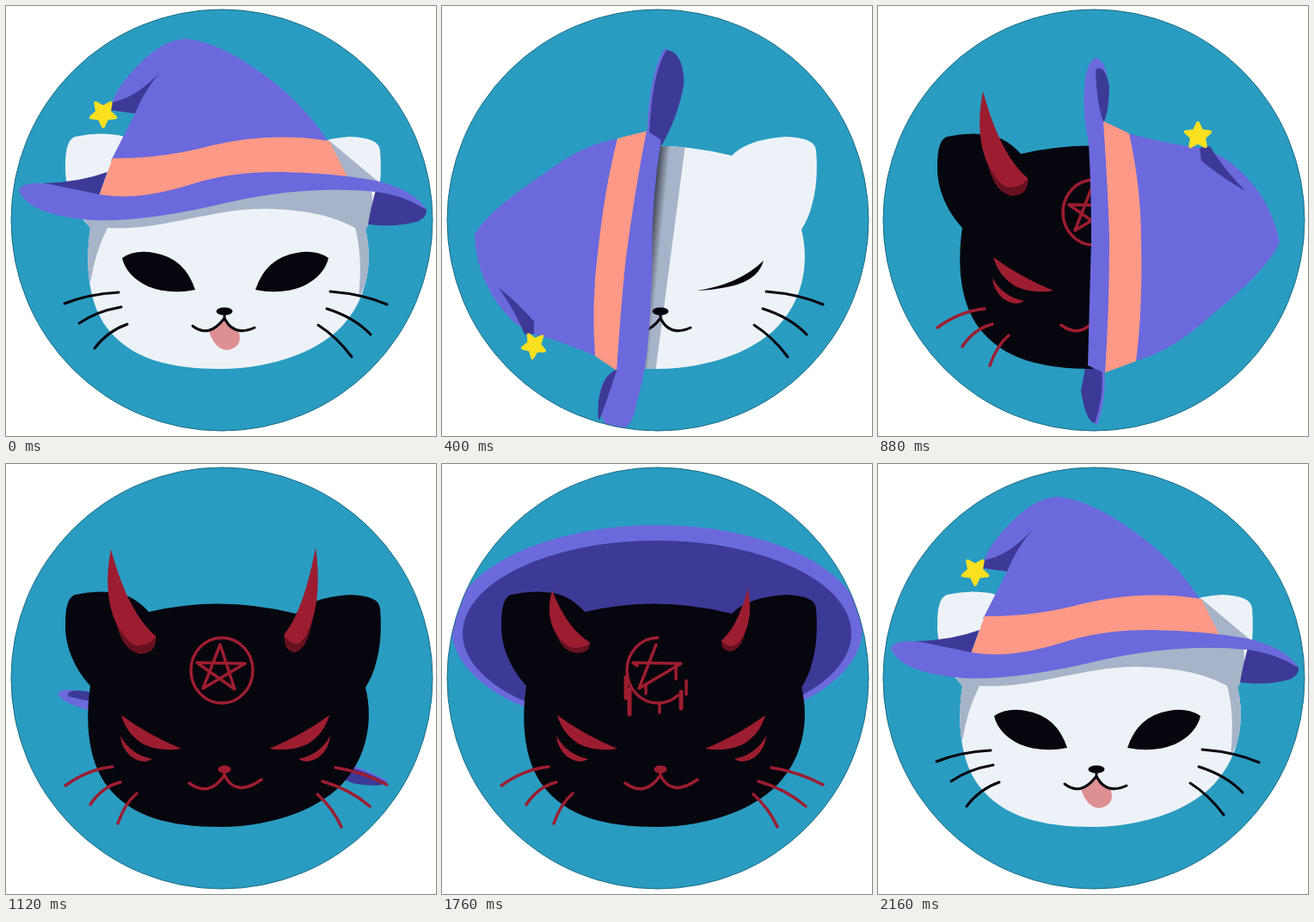
Write an HTML page with a canvas that moves like this. It is 500x500 px and loops after 2.4 s.

```html
<!DOCTYPE html>
<html lang="en">
<head>
<meta charset="utf-8">
<title>Cat and hat</title>
<style>
html, body { margin: 0; width: 100%; height: 100%; overflow: hidden; background: #fff; }
canvas { display: block; width: 100vw; height: 100vh; }
</style>
</head>
<body>
<canvas id="stage" width="500" height="500"></canvas>
<script>
const STEP = 80, LOOP = 2400;
const SKY = '#2a9cc1', FUR = '#edf2f8', SNOW = '#f8f9fc', SHADE = '#a7b3c8', INK = '#06060f',
  PURPLE = '#6c69dc', INDIGO = '#3d3a97', PINK = '#fd9986', RUST = '#c96b60',
  RED = '#9d1d30', BLOOD = '#661120', GOLD = '#fbe01f';

const stage = document.getElementById('stage').getContext('2d');
const layer = Object.assign(document.createElement('canvas'), { width: 500, height: 500 }).getContext('2d');

const HEAD = new Path2D('M98 258C82 240 68 215 69 185Q69 156 80 152Q105 146 130 150Q150 154 166 172Q250 152 337 174Q355 155 400 152Q434 153 435 168Q438 205 430 232Q427 245 418 260C428 300 418 340 396 366C370 400 310 422 250 422C190 422 145 410 118 375C95 345 92 300 98 258Z');

function shape(g, color, d) {
  g.fillStyle = color;
  g.fill(new Path2D(d));
}

function line(g, color, width, d) {
  g.strokeStyle = color;
  g.lineWidth = width;
  g.lineCap = g.lineJoin = 'round';
  g.stroke(new Path2D(d));
}

function oval(g, color, x, y, rx, ry) {
  g.fillStyle = color;
  g.beginPath();
  g.ellipse(x, y, rx, ry, 0, 0, 7);
  g.fill();
}

function within(g, draw) {
  g.save();
  draw();
  g.restore();
}

// Draws the left half feature, then its reflection.
function bothSides(g, draw) {
  draw();
  within(g, () => { g.transform(-1, 0, 0, 1, 510, 0); draw(); });
}

function star(g, x, y, r, degrees) {
  g.beginPath();
  for (let i = 0; i < 10; i++) {
    const a = degrees * Math.PI / 180 + i * Math.PI / 5, q = i % 2 ? r * .48 : r;
    g.lineTo(x + q * Math.cos(a), y + q * Math.sin(a));
  }
  g.closePath();
  g.fillStyle = g.strokeStyle = GOLD;
  g.lineWidth = 4;
  g.lineJoin = 'round';
  g.fill();
  g.stroke();
}

// ---- cat ----

function whiteFace(g, open) {
  bothSides(g, () => shape(g, INK, open
    ? 'M135 293Q150 283 172 287Q208 293 220 330Q190 336 165 326Q140 314 135 293Z'
    : 'M214 331Q165 324 136 296Q143 322 185 328Q200 331 214 331Z'));
  if (open) shape(g, '#dd8f92', 'M236 378Q248 376 255 363Q262 378 270 377Q277 396 258 400Q243 400 236 378Z');
  oval(g, INK, 254, 355, 9.5, 4.5);
  line(g, INK, 3, 'M254 357V364M217 372Q236 387 254 363Q265 385 289 374');
  line(g, INK, 3, 'M131 333Q95 335 68 346M134 350Q105 355 85 369M141 370Q118 378 103 398');
  line(g, INK, 3, 'M377 332Q415 335 443 347M373 352Q405 362 424 382M363 371Q385 385 402 408');
}

// The ring and the star are drawn in together as the amount grows.
function pentagram(g, amount) {
  if (!amount) return;
  within(g, () => {
    g.setLineDash([236 * amount, 999]);
    line(g, RED, 3.5, 'M251 202a36 38 0 0 0 0 76a36 38 0 0 0 0 -76');
    g.setLineDash([290 * amount, 999]);
    line(g, RED, 3.5, 'M249 210L229 261L278 232L222 231L266 262Z');
  });
}

function darkFace(g, pose) {
  g.fillStyle = INK;
  g.fill(HEAD);
  bothSides(g, () => {
    shape(g, RED, 'M134 292Q165 315 204 331Q180 335 160 326Q140 314 134 292Z');
    shape(g, RED, 'M133 316Q145 338 170 343Q160 350 145 340Q134 330 133 316Z');
  });
  oval(g, RED, 254, 355, 7.5, 4.5);
  line(g, RED, 3.5, 'M254 357V362M213 371Q236 388 254 362Q267 388 297 367');
  line(g, RED, 3.5, 'M124 352Q95 355 69 374M133 370Q112 375 98 396M152 383Q138 395 130 418');
  line(g, RED, 3.5, 'M383 353Q415 358 443 373M368 369Q400 378 423 398M362 384Q380 400 390 422');
  pentagram(g, pose.horns[0]);
  if (pose.drips) {
    line(g, RED, 5, 'M214 248V272M218 262V291M278 265V284');
    line(g, RED, 3.5, 'M253 278V289M237 256V267M272 234V250M284 252V268');
  }
}

function horn(g, size, right) {
  if (!size) return;
  within(g, () => {
    if (right) g.transform(-.7, 0, 0, 1, 445.4, -2);
    g.translate(160, 218);
    g.scale(.6 + .4 * size, size);
    g.translate(-160, -218);
    shape(g, RED, 'M122 99C133 140 150 180 174 200Q175 218 160 220Q138 222 128 185Q112 150 122 99Z');
    shape(g, BLOOD, 'M127 182Q140 209 152 211Q166 211 173 202Q176 219 156 221Q137 217 127 182Z');
  });
}

// Gradient whose opaque part is where the cat has turned dark.
function darkness(pose) {
  const { edge, core } = pose;
  const g = core
    ? layer.createRadialGradient(250, 225, core - 30, 250, 225, core)
    : layer.createLinearGradient(edge - 10, 165, edge + 10, 167);
  g.addColorStop(0, '#000');
  g.addColorStop(1, 'transparent');
  return g;
}

function masked(mode, pose, draw) {
  layer.clearRect(0, 0, 500, 500);
  draw(layer);
  layer.globalCompositeOperation = mode;
  layer.fillStyle = darkness(pose);
  layer.fillRect(0, 0, 500, 500);
  layer.globalCompositeOperation = 'source-over';
  stage.drawImage(layer.canvas, 0, 0);
}

function shadow(g, pose) {
  g.clip(HEAD);
  if (pose.shade === 'brim') {
    place(g, pose.at);
    g.fillStyle = SHADE;
    g.fillRect(-240, -5, 480, 43);
  } else if (pose.shade === 'full') {
    g.fillStyle = SHADE;
    g.fillRect(0, 240, 500, 200);
    shape(g, FUR, 'M212 420L250 400Q310 396 356 387L328 412Q280 428 212 420Z');
  } else if (pose.shade) {
    shape(g, SHADE, 'M90 235L92 250L92 300L98 322Q104 285 118 258C180 262 250 232 310 236Q370 238 406 258Q415 290 410 340L430 300L425 210L436 207L374 155L340 200Z');
  }
}

function cat(pose) {
  const allDark = pose.edge >= 500 && !pose.core;
  if (!allDark) {
    stage.fillStyle = pose.shade ? FUR : SNOW;
    stage.fill(HEAD);
    within(stage, () => shadow(stage, pose));
    masked('destination-out', pose, g => whiteFace(g, pose.open));
  }
  masked('destination-in', pose, g => darkFace(g, pose));
  horn(stage, pose.horns[0], false);
  horn(stage, pose.horns[1], true);
}

// ---- hat, one drawing for each point of view ----

function place(g, [x, y, degrees = 0, sx = 1, sy = 1]) {
  g.translate(x, y);
  g.rotate(degrees * Math.PI / 180);
  g.scale(sx, sy);
}

// How wide the brim opens towards the viewer while the hat turns.
function spread([, , degrees]) {
  return Math.sqrt(Math.min(1, Math.max(0, (270 + degrees) / 188)));
}

const hats = {
  front(g) {
    g.translate(-250, -240);
    shape(g, INDIGO, 'M45 206Q85 205 118 193L108 221Q80 215 45 208Z');
    shape(g, PURPLE, 'M122 180L150 125L121 121Q125 100 145 78Q180 38 210 38Q245 42 290 73Q345 110 376 160Q300 158 240 170Q180 184 122 180Z');
    shape(g, INDIGO, 'M122 112Q150 108 179 77Q160 100 150 125L121 121Z');
    shape(g, PINK, 'M124 177Q180 178 240 162Q310 146 376 157L397 199Q310 198 240 210Q160 228 108 221Z');
    shape(g, INDIGO, 'M430 214Q424 235 421 254Q455 258 480 250Q490 245 489 236Q470 222 430 214Z');
    shape(g, PURPLE, 'M15 214Q20 203 50 207Q80 213 108 219Q150 227 210 209Q260 192 320 193Q380 194 430 203Q475 214 489 237Q460 219 430 216Q350 208 260 228Q160 252 100 249Q25 243 15 214Z');
    star(g, 113, 125, 15, 90);
  },
  side(g, s) {
    shape(g, PURPLE, 'M-124 -40Q-110 -95 -107 -125L-97 -150Q-60 -205 3 -217Q35 -203 88 -137Q130 -92 141 -48Q60 -54 -2 -52Q-60 -48 -124 -40Z');
    shape(g, INDIGO, 'M-107 -124L-109 -136Q-85 -150 -57 -177Q-72 -150 -92 -126Z');
    shape(g, PINK, 'M-139 -10L-124 -42Q-60 -56 0 -56Q80 -58 141 -50L155 -12Q80 -16 0 -16Q-80 -14 -139 -10Z');
    shape(g, PURPLE, `M155 -14Q80 -19 0 -19Q-50 -18 -137 -12Q-145 ${-18 - 12 * s} -178 ${-18 - 12 * s}
      Q-208 ${-16 - 6 * s} -212 -3Q-205 ${9 + 10 * s} -175 ${10 + 9 * s}Q-145 ${12 + 12 * s} -112 ${5 + 19 * s}
      Q-60 ${2 + 20 * s} 0 ${2 + 13 * s}Q70 4 146 6Z`);
    shape(g, INDIGO, `M-137 -12Q-160 ${-4 - 12 * s} -198 ${-3 - 22 * s}
      Q-205 ${-14 - 14 * s} -178 ${-19 - 11 * s}Q-145 ${-18 - 12 * s} -137 -12Z`);
    star(g, -121, -122, 15, 180);
  },
  inverted(g) {
    g.translate(-250, -365);
    shape(g, PURPLE, 'M50 361Q53 348 90 350L135 352V384Q85 387 60 377Q50 372 50 361Z');
    shape(g, INDIGO, 'M466 356Q462 372 420 377L375 380V355Q420 347 460 350Q466 352 466 356Z');
    shape(g, INDIGO, 'M228 418Q236 432 252 434Q268 432 276 418Z');
    star(g, 260, 446, 15, 245);
  },
  under(g) {
    oval(g, PURPLE, 0, 0, 239, 120);
    oval(g, INDIGO, 0, 6, 226, 108);
  },
  top(g) {
    g.translate(-250, -262);
    shape(g, INDIGO, 'M12 248Q30 290 75 304Q105 345 165 371Q260 388 340 375Q410 350 432 318Q480 305 485 285L420 270L80 255Z');
    shape(g, RUST, 'M78 260Q110 300 142 311V324Q95 302 78 260ZM418 274Q390 330 330 347Q270 362 212 356L235 344Q310 350 350 328Q395 305 418 274Z');
    shape(g, PURPLE, 'M12 249Q20 240 75 219Q130 145 240 142Q370 146 426 244Q470 255 484 278Q487 287 478 289Q450 285 419 278L80 263Q40 262 12 249Z');
    shape(g, PURPLE, 'M80 262Q108 288 137 299L136 330Q146 362 146 374Q200 366 240 340Q250 325 262 322Q325 325 360 308Q400 296 419 275L250 220Z');
    line(g, PINK, 10, 'M80 260Q85 232 125 205Q180 173 250 173Q320 174 360 205Q385 225 417 271');
    star(g, 137, 384, 18, 90);
  }
};

// Parts of a hat that lie behind the cat even when the hat is in front.
const backs = {
  side(g, s) {
    const end = 213 + 42 * s;
    const rim = `Q${end - 30} ${-14 - 4 * s} 155 -12`;
    shape(g, INDIGO, `M138 7Q175 ${14 + 10 * s} ${end - 38} ${14 + 12 * s}Q${end + 2} ${8 + 12 * s} ${end} -4${rim}Z`);
    line(g, PURPLE, 3, `M${end} -4${rim}`);
  }
};

// ---- poses, one for each step ----

const REST = { hat: 'front', at: [250, 240], edge: -50, horns: [0, 0], shade: 'rest', open: true };
const light = (hat, at, more) => ({ ...REST, hat, at, open: false, ...more });
const turning = (edge, left, at, shade) => light('side', at, { edge, horns: [left, 0], shade });
const dark = (hat, at, more) => ({ hat, at, edge: 600, horns: [1, 1], ...more });

const POSES = [
  REST, REST, REST,
  light('front', [244, 248, -24]),
  turning(-50, 0, [240, 275, -54, .96, .92], 'brim'),
  turning(255, 0, [231, 294, -82.5, .96, .9], 'brim'),
  turning(262, 0, [247, 296, -118, 1.04, .89], 'brim'),
  turning(265, .36, [263, 294, -155, 1.11, .885]),
  turning(300, .68, [262, 288, -185, 1.1, .92]),
  turning(380, 1, [258, 282, -213, 1.07, .95]),
  dark('side', [253, 276, -242, 1.03, .98], { horns: [1, 0] }),
  dark('side', [250, 272, -270], { horns: [1, 0] }),
  dark('side', [252, 272, -300], { horns: [1, .36] }),
  dark('side', [248, 285, -328, 1.05, 1], { horns: [1, .68], behind: true }),
  dark('side', [250, 320, -345, .93, .7], { behind: true }),
  dark('inverted', [250, 362, 0, .98, 1], { behind: true }),
  dark(), dark(),
  dark(null, null, { drips: true }), dark(null, null, { drips: true }),
  dark('inverted', [250, 365], { drips: true, behind: true }),
  dark('under', [250, 290, 0, 1, .5], { drips: true, behind: true }),
  dark('under', [250, 191], { drips: true, behind: true, horns: [.6, .6] }),
  dark('top', [250, 215], { core: 235, horns: [0, 0], shade: 'full' }),
  dark('top', [250, 262], { core: 194, horns: [0, 0], shade: 'full' }),
  light('front', [250, 258, 0, 1, .55]),
  light('front', [250, 242, 0, 1, .84]),
  REST, REST, REST
];

function drawHat(parts, pose) {
  const draw = parts[pose.hat];
  if (!draw) return;
  within(stage, () => {
    place(stage, pose.at);
    draw(stage, spread(pose.at));
  });
}

// The part of the cat inside a turning hat stays hidden.
function clipToBrim(pose) {
  const below = new Path2D(), m = new DOMMatrix();
  m.translateSelf(pose.at[0], pose.at[1]).rotateSelf(pose.at[2]);
  const half = new Path2D('M-600 0H600V600H-600Z');
  below.addPath(half, m);
  stage.clip(below);
}

function render(time) {
  const pose = POSES[Math.floor(time % LOOP / STEP)];
  stage.clearRect(0, 0, 500, 500);
  within(stage, () => {
    oval(stage, SKY, 251, 249, 245, 245);
    stage.clip();
    drawHat(backs, pose);
    if (pose.behind) drawHat(hats, pose);
    within(stage, () => {
      if (pose.hat === 'side' && !pose.behind) clipToBrim(pose);
      cat(pose);
    });
    if (!pose.behind) drawHat(hats, pose);
  });
  stage.strokeStyle = '#1c6a84';
  stage.lineWidth = 1;
  stage.beginPath();
  stage.arc(251, 249, 245, 0, 7);
  stage.stroke();
}

const start = performance.now();
function tick() {
  render(performance.now() - start);
  requestAnimationFrame(tick);
}
tick();
</script>
</body>
</html>
```
